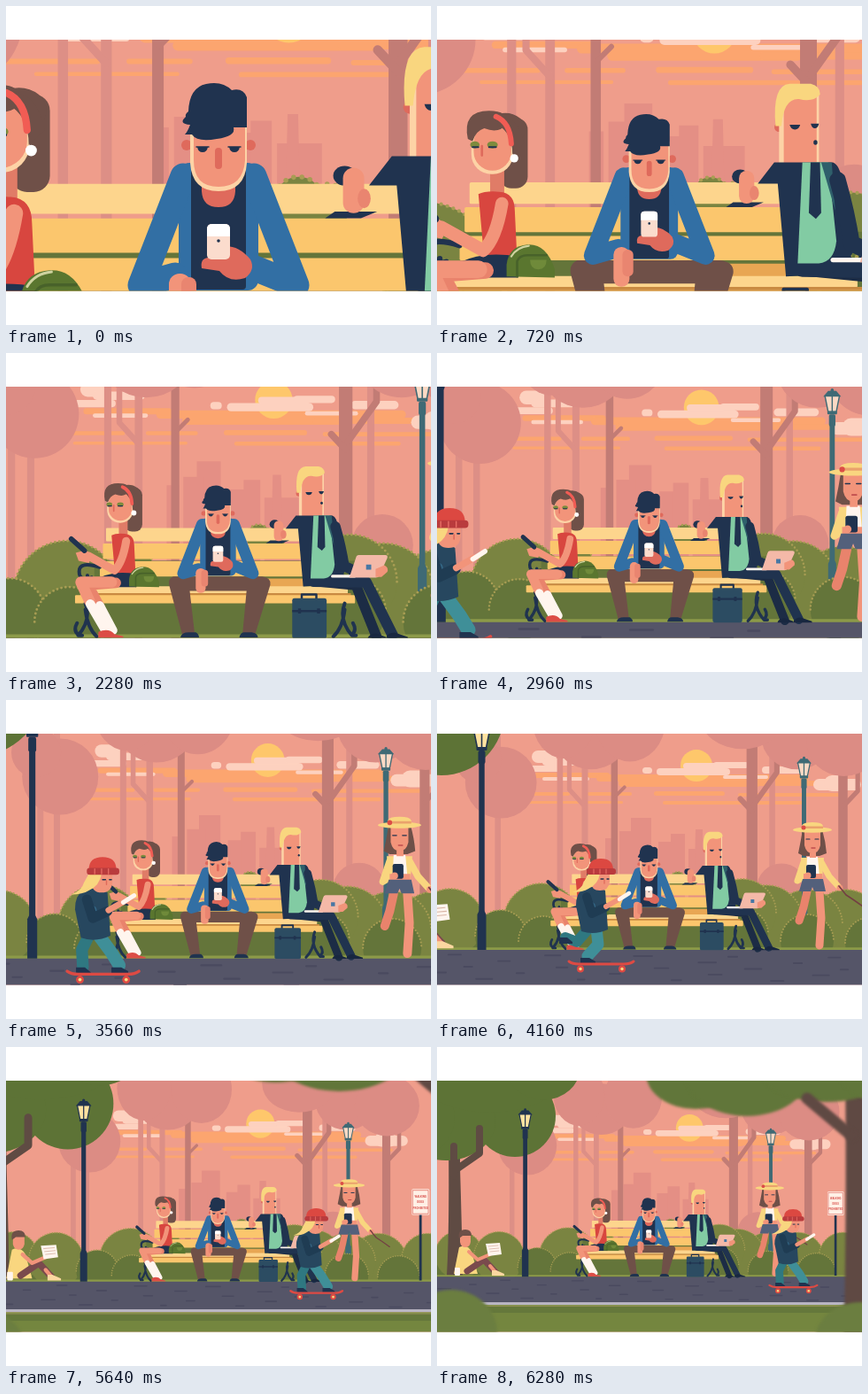
These frames come from a looping animation (480 by 360 pixels, 6.32 s). An HTML page with a canvas:

```html
<!DOCTYPE html>
<html lang="en">
<head>
<meta charset="utf-8">
<title>Park bench</title>
<style>
html, body { margin: 0; width: 100%; height: 100%; overflow: hidden; background: #fff }
canvas { display: block; width: 480px; height: 360px }
</style>
</head>
<body>
<canvas id="stage" width="480" height="360"></canvas>
<script>
const c = document.getElementById('stage').getContext('2d');
const LOOP = 6320, CX = 239, CY = 194.7;
const NAVY = '#20334f', SKIN = '#f2947a', RED = '#df6a5c', RIM = '#fdd3a6', BLUE = '#326fa4',
  YELLOW = '#f9d67f', TEAL = '#3f8f98', WHITE = '#fff5ee', BROWN = '#6f5048',
  OLIVE = '#64753a', MOSS = '#7a8441';
// Camera distances at which the parts were laid out
const NEAR = .385, CLOSE = .708, MID = 1, WIDE = 1.246, FAR = 1.685;
let dist = NEAR;

function fill(color, d) { c.fillStyle = color; c.fill(new Path2D(d)); }
function line(color, width, d) {
  c.strokeStyle = color; c.lineWidth = width; c.stroke(new Path2D(d));
}
function box(color, x, y, w, h, r = 0) {
  c.fillStyle = color; c.beginPath(); c.roundRect(x, y, w, h, r); c.fill();
}
function oval(color, x, y, rx, ry = rx) {
  c.fillStyle = color; c.beginPath(); c.ellipse(x, y, rx, ry, 0, 0, 7); c.fill();
}
function shifted(x, y, draw) {
  c.save(); c.translate(x, y); draw(); c.restore();
}
// Perspective dolly: depth is relative to the bench
function layer(depth, ref, draw) {
  if (dist + depth < .1) return;
  const k = (ref + depth) / (dist + depth);
  c.save();
  c.translate(CX, CY); c.scale(k, k); c.translate(-CX, -CY);
  draw();
  c.restore();
}
function mix(a, b, u) { return a + (b - a) * u; }

function sky() {
  const peach = '#fdd1bf', orange = '#fca56f';
  const row = (color, list) => list.forEach(([x, y, w, h]) => box(color, x, y, w, h, h / 2));
  row(orange, [[110, 82, 85, 6], [180, 84, 240, 8], [205, 90, 160, 8], [330, 91, 100, 6], [60, 104, 90, 4],
    [170, 104, 50, 4], [245, 103, 80, 5], [340, 105, 120, 4], [100, 114, 110, 3], [255, 114, 160, 4]]);
  oval('#fec76b', 293, 74, 18);
  row(peach, [[107, 57, 28, 14], [101, 74, 40, 7], [119, 66, 50, 8], [119, 87, 53, 4],
    [232, 76, 11, 7], [248, 77, 83, 8], [278, 71, 50, 7], [323, 85, 51, 4],
    [367, 75, 46, 8], [312, 70, 40, 7], [425, 89, 54, 13], [437, 85, 28, 18]]);
}

function city() {
  const d = '#e48f85';
  box(d, 219, 133, 23, 100); box(d, 206, 148, 20, 90); box(d, 190, 156, 12, 80);
  box(d, 250, 160, 22, 80); box(d, 264, 151, 16, 90); box(d, 284, 168, 34, 80);
  fill(d, 'M292 146h8l2 90h-12z');
}

function pinkTrees() {
  const light = '#dd8f86', dark = '#c27c75', leaf = '#dc8c84';
  const trunk = (color, x, w) => box(color, x - w / 2, -80, w, 400);
  for (const x of [25, 45, 125, 398]) trunk(light, x, 7.5);
  trunk(light, 157, 8);
  line(light, 6, 'M137 -80V88L157 110');
  trunk(dark, 195, 8.5);
  line(dark, 4.5, 'M196 97L208 85');
  trunk(dark, 372, 14);
  line(dark, 7, 'M372 116L357 100M374 108L404 66V-80');
  trunk(dark, 489, 12);
  line(dark, 6, 'M489 110L508 90V-80');
  oval(leaf, 49, 79, 46); oval(leaf, 20, 50, 30);
  oval(leaf, 165, 22, 46, 40); oval(leaf, 215, 2, 45, 50); oval(leaf, 130, 0, 40, 48);
  oval(leaf, 430, 20, 46, 42); oval(leaf, 490, 26, 48, 45); oval(leaf, 360, -6, 55, 42);
  oval(leaf, 410, 215, 32);
}

function bush(x, y, r, color = MOSS) {
  oval(color, x, y, r);
  c.setLineDash([0, 3.4]);
  line('#a89d53', 2, `M${x - r} ${y}a${r} ${r} 0 0 1 ${2 * r} 0`);
  c.setLineDash([]);
}
function backBushes() {
  box(OLIVE, -400, 256, 1400, 50);
  bush(-45, 248, 36); bush(15, 251, 38); bush(118, 250, 43); bush(176, 222, 10);
  bush(272, 204, 10); bush(284, 206, 9); bush(462, 254, 40); bush(530, 250, 36);
  bush(418, 254, 40); bush(372, 250, 41); bush(345, 240, 38);
  box(OLIVE, 140, 223, 215, 60);
}
function frontBushes() {
  bush(72, 266, 29, OLIVE); bush(120, 272, 28, OLIVE); bush(346, 264, 28, OLIVE);
  bush(418, 272, 30, OLIVE); bush(490, 274, 29, OLIVE);
}

function ground() {
  box('#8c9a48', -700, 300, 2000, 4);
  box('#555568', -700, 303.5, 2000, 50);
  for (let i = 0; i < 46; i++) {
    const y = 307 + (i * 17) % 42;
    box('#4a4a5f', -330 + i * 27 + (i * i * 7) % 19, y, 12 + (i * 11) % 17, 2.4, 1.2);
  }
  box('#b9b5c2', -700, 352, 2000, 5);
  box('#82924a', -700, 357, 2000, 3);
  box('#65783b', -700, 360, 2000, 14);
  box('#74863f', -700, 372, 2000, 100);
}

function lamp(x, color, glass) {
  box(color, x - 3.2, 70, 6.4, 206);
  fill(color, `M${x - 5} 282v-40q5 -12 10 0v40z`);
  fill(glass, `M${x - 9} 34h18l-4 20h-10z`);
  line(color, 1.6, `M${x - 9} 34l4 20h10l4 -20M${x} 34v20`);
  fill(color, `M${x - 11} 35l6 -7h10l6 7z`);
  box(color, x - 2, 25, 4, 5, 2);
  box(color, x - 6, 53, 12, 4, 1); box(color, x - 4, 57, 8, 15, 2);
}

function leftTree() {
  const wood = '#5f4b43', leaf = '#5d7336';
  fill(wood, 'M11 258Q15 190 12 40H26V135Q28 200 29 258Z');
  oval(leaf, 88, 78, 46, 46); oval(leaf, 10, 84, 56, 44); oval(leaf, -40, 80, 60, 50);
  oval(leaf, 60, 22, 90, 52); oval(leaf, 120, 22, 42, 38);
  line(wood, 8, 'M19 146V112M22 138L48 120V92');
}

function reader() {
  fill(YELLOW, 'M25 226Q34 222 39 231L46 256H19Z');
  line('#7a4a4d', 7, 'M34 253L53 240L66 254');
  line(SKIN, 4, 'M36 231L46 240L60 234M60 247L66 254');
  fill(SKIN, 'M26 211h12v9q-1 6 -6 6t-6 -6z');
  fill(BROWN, 'M25 216q-2 -10 7 -10q7 0 7 7h-10z');
  fill(WHITE, 'M55 222l16 -1l2 13l-15 2z');
  line('#d8b5a6', .8, 'M58 225l11 -1M59 228l11 -1M60 231l10 -1');
  fill('#fbd7a0', 'M62 252h5l9 4v2H62z');
  box(WHITE, 20, 249, 6, 9, 1);
}

function bench() {
  const wood = '#fbc66d', iron = side =>
    line(NAVY, 3.4, `M${side(125)} 235Q${side(105)} 229 ${side(105)} 239T${side(117)} 245` +
      `M${side(113)} 243V252M${side(111)} 270Q${side(117)} 286 ${side(104)} 301h4` +
      `M${side(111)} 276Q${side(113)} 294 ${side(122)} 302` +
      `M${side(103)} 289Q${side(99)} 296 ${side(104)} 300`);
  box('#fdd58d', 131, 197, 214, 13, 1);
  box(wood, 128, 212, 220, 15, 1); box(wood, 125, 229.3, 226, 14.7, 1);
  box('#e8a653', 285, 246, 37, 8);
  box('#fdd58d', 109, 253.5, 256, 7, 1);
  box('#c98a42', 106, 260, 262, 3);
  box(wood, 101, 262, 271, 8, 1);
  iron(x => x); iron(x => 473 - x);
}

function girl() {
  box(BROWN, 112, 143, 24, 60, 10);
  oval(BROWN, 117, 153, 17, 14);
  fill('#e07c67', 'M104 186h12v22q-6 6 -12 0z');
  fill('#d8463f', 'M94 208Q100 205 112 206Q125 207 125 222L127 264H99Z');
  box(RIM, 88, 148, 35.5, 43, 17);
  box(SKIN, 90, 148, 32, 40, 16);
  fill(BROWN, 'M85 161Q80 137 103 137Q120 137 118 148Q112 157 99 152Q92 154 89 163Z');
  fill(BROWN, 'M112 142Q128 141 133 165L123 174Q123 156 110 149Z');
  line('#f15c54', 4.5, 'M109 142Q121 147 122 165');
  oval('#7d8b3d', 91, 166, 4, 3); oval('#7d8b3d', 106, 166, 4.5, 3);
  line(NAVY, 1.4, 'M89 168h5M103 168h6');
  line(RED, 2, 'M97 167v8');
  oval('#fff', 124.5, 177.5, 3.5);
  fill(NAVY, 'M78 266Q98 256 128 261V279H84Z');
  line('#e9836c', 14, 'M100 273L62 276L78 306');
  line(WHITE, 12, 'M78 304L96 338');
  line(SKIN, 15, 'M94 272L52 272L64 298');
  line(WHITE, 13, 'M65 302L86 338');
  fill('#dc4d46', 'M76 340q14 -6 22 3l12 3v2H76z');
  line(SKIN, 11, 'M114 216Q109 246 98 256L62 236');
  fill(SKIN, 'M45 232l14 -4l9 8l-5 10l-14 -3z');
  line(NAVY, 7, 'M39 213L57 229');
}

function bag() {
  fill('#5a762f', 'M118 278V268Q120 252 136 251Q152 250 159 272V279Z');
  line('#cfd3a0', 1.6, 'M122 261Q127 253 137 252');
  line('#48622a', 2, 'M127 278V265Q129 260 136 260H152');
  fill('#6f8a3a', 'M138 264h14q0 8 -7 8t-7 -8z');
}

function centreLegs() {
  fill(BROWN, 'M196 244H282Q291 245 290 252L275 301H263L267 258H212L217 301H205L192 252Q191 246 196 244Z');
  fill(NAVY, 'M203 303q1 -5 8 -5h7q3 2 3 5zM260 303q1 -5 5 -5h7q6 1 6 5z');
}
function centreHead() {
  oval(RED, 204, 157, 6); oval(RED, 276, 157, 6);
  fill(RIM, 'M208 130H272V177Q270 209 240 209T208 177Z');
  fill(SKIN, 'M212 130H270V174Q268 204 240 204T212 174Z');
  fill(NAVY, 'M202 145H210Q216 154 238 150Q260 147 257 137H272V103Q268 92 255 95Q244 84 226 88Q207 92 206 119Q202 122 203 125Q194 133 208 134Q205 142 202 145Z');
  box(RED, 236, 160, 8, 24, 4);
  fill(NAVY, 'M216 159h12q-1 6 -6 6t-6 -6zM252 159h12q-1 6 -6 6t-6 -6z');
  line(NAVY, 1.5, 'M215 159h14M251 159h14');
}
function centreMan(t) {
  // The head sinks to the phone and lifts again before the loop closes
  const nod = 7 * Math.min(1, t / .7, (6.32 - t) / .7);
  box(BLUE, 195, 177, 90, 144, 12);
  line(BLUE, 29, 'M200 192L152 315L191 304M280 192L328 315L276 294');
  box(NAVY, 209, 184, 62, 136, 4);
  fill(RED, 'M221 195H259V209Q258 227 240 227T221 209Z');
  shifted(0, nod, centreHead);
  fill(RED, 'M246 271Q263 270 276 286Q282 298 270 307Q252 313 241 299L221 296Q219 285 228 284H246Z');
  box('#fbdccd', 227, 246, 26, 40, 5);
  fill('#fff', 'M227 260V252Q227 246 233 246H247Q253 246 253 252V260Z');
  oval(NAVY, 240, 265, 1.8);
  box(SKIN, 184, 302, 25, 62, 12);
  box('#e98570', 198, 306, 17, 42, 8);
}

function suitHead() {
  oval(RED, 357, 151, 4);
  fill(RIM, 'M357 122H391V182H357Z');
  fill(SKIN, 'M361 122H389V182H361Z');
  fill(YELLOW, 'M354 150Q351 115 366 114H384Q392 116 392 123Q386 130 374 127Q361 126 359 150Z');
  fill(NAVY, 'M366 149h9q-1 4 -4.500 4t-4.500 -4zM384 148h7q-1 4 -3.500 4t-3.500 -4z');
  oval(NAVY, 388, 164, 1.7, 2);
}
function suitMan(t) {
  const sway = 3.5 * (Math.cos(t * 8 * Math.PI / 6.32) - 1);
  line('#1c2c45', 14, 'M365 270L428 276L456 346');
  line(NAVY, 15, 'M370 271L442 272L478 344');
  fill('#182740', 'M444 349q2 -7 12 -7l13 5v2zM469 349q2 -8 12 -8l18 6v2z');
  shifted(sway, 0, suitHead);
  fill(NAVY, 'M332 199L346 181H396Q402 183 404 198L414 255Q408 270 393 276L356 278L349 199Z');
  fill(NAVY, 'M305 219h22l10 -4h-26z');
  oval(NAVY, 317, 193, 7, 6);
  box(SKIN, 316, 188, 13, 28, 6.5);
  oval('#e98570', 329, 207, 4, 6);
  fill('#82cba3', 'M370 181H392L399 248Q397 266 384 267H366Z');
  fill('#2f5f6b', 'M386 181H395L398 222Z');
  fill(NAVY, 'M377 181h8l1 43l-4.500 5l-6 -5z');
  line(NAVY, 14, 'M400 196Q408 224 412 250L434 260');
  box(WHITE, 394, 262, 34, 4, 2);
  fill('#f4b9a8', 'M432 235H468Q472 235 471 239L460 263Q459 266 455 266H419L428 239Q429 235 432 235Z');
  box('#4777a4', 442, 248, 7, 7);
  fill(SKIN, 'M455 254l12 -5q6 3 4 9l-8 7h-8z');
}

function briefcase() {
  line(NAVY, 3, 'M354 295V289H374V295');
  box('#2c4c62', 341, 294, 47, 55, 3);
  box(NAVY, 341, 310, 47, 3);
  box(NAVY, 349, 308, 4, 7); box(NAVY, 375, 308, 4, 7);
}

function hatWoman() {
  fill(BROWN, 'M413 146h22q4 14 5 27l-8 3h-18l-6 -3q3 -14 5 -27z');
  line('#e9836c', 9, 'M418 216L414 234L409 249');
  line(SKIN, 9, 'M432 216L434 246L432 277');
  line(YELLOW, 7, 'M414 183L407 204L420 196M434 183L443 199L453 210');
  fill(YELLOW, 'M411 178H437L435 202H413Z');
  fill(WHITE, 'M418 177h12l2 22h-15z');
  box(SKIN, 414, 196, 21, 8);
  fill('#53607b', 'M413 202H436L439 216H426L424 211L422 216H409Z');
  fill(SKIN, 'M415 149h18v15q-2 9 -9 9t-9 -9zM421 171h7v7h-7z');
  line(NAVY, 1.2, 'M417 157h4M427 157h4'); line('#c04e4e', 1.4, 'M423 167h4');
  fill(YELLOW, 'M412 147V142Q413 138 424 138T436 142V147Z');
  oval(YELLOW, 424, 146.5, 22, 3.2);
  box('#eaa26c', 412, 142.5, 24, 2.5);
  oval('#dc4d46', 414, 144, 2.5);
  box(NAVY, 417, 186, 11, 15, 2); oval(SKIN, 419, 198, 3.5);
  oval(SKIN, 455, 212, 3.5);
  line('#733f43', 1.6, 'M454 210L462 220Q470 225 481 233');
}

function sign() {
  box(NAVY, 448.8, 185, 2.6, 73);
  box('#fff0e6', 441, 163, 18.5, 27, 1.5);
  line('#e26b60', .7, 'M442.3 164.3h16v24.4h-16z');
  c.fillStyle = '#d9534e'; c.textAlign = 'center';
  c.font = 'bold 2.8px Roboto, sans-serif';
  ['WALKING', 'DOGS', 'PROHIBITED'].forEach((word, i) => c.fillText(word, 450.2, 172 + i * 5.8));
}

function skaterX(t) {
  const keys = [[2.96, -224], [4.16, -67], [5, 71], [6.28, 275]];
  const i = t < 4.16 ? 0 : t < 5 ? 1 : 2, [a, x] = keys[i], [b, y] = keys[i + 1];
  return mix(x, y, (t - a) / (b - a));
}
function skater(t) {
  const p = Math.max(0, 1 - Math.abs(t - 4.16) / .5), u = p * p * (3 - 2 * p);
  const fx = mix(165, 145, u), fy = mix(291, 268, u), kx = mix(164, 158, u);
  const front = mix(202, 170, u);
  c.translate((skaterX(t) + 67) / WIDE, 0);
  line('#2f7881', 12, `M172 257L${kx} 273L${fx} ${fy}`);
  fill(NAVY, `M${fx - 7} ${fy}h9l6 5v2h-15z`);
  line(TEAL, 13, `M180 257L${mix(194, 182, u)} 276L${front} 289`);
  fill(NAVY, `M${front - 8} 291h10l7 4v2h-17z`);
  line('#dd4a43', 3, 'M149 295Q153 298 160 298H211Q218 298 222 295');
  for (const x of [162, 209]) { oval('#dd4a43', x, 303.5, 4); oval(YELLOW, x, 303.5, 1.7); }
  fill('#27475f', 'M165 213Q180 208 190 215L193 259Q178 266 163 261L157 232Q157 218 165 213Z');
  oval('#356887', 174, 233, 5);
  fill(SKIN, 'M174 195h21v10q-1 10 -11 10t-10 -10z');
  fill(YELLOW, 'M171 196h13q-2 12 -13 17q-6 4 -18 4q11 -4 13 -12z');
  line(NAVY, 1.3, 'M185 202h3M192 202h2'); line(RED, 1.3, 'M189 203v4');
  fill('#dc4841', 'M171 192Q171 179 185 179T199 192Z');
  box('#b93b3d', 169, 190, 33, 7, 3);
  line('#ee746a', 1, 'M177 191v5M184 191v5M191 191v5');
  line('#1f3c53', 10, 'M169 222L175 241L190 234');
  line(SKIN, 6, 'M191 233L207 224');
  line(WHITE, 4.5, 'M206 225L217 218');
}

function foreground() {
  const wood = '#5f4943', leaf = '#61763a';
  c.filter = 'blur(1.5px)';
  fill(wood, 'M461 20H530V340H459Q463 200 461 20Z');
  oval(leaf, 292, 30, 56, 40); oval(leaf, 350, 30, 70, 48);
  oval(leaf, 440, 20, 80, 42); oval(leaf, 520, 20, 70, 46);
  line(wood, 13, 'M418 58L468 100');
  oval('#6b7e40', 16, 323, 52, 49); oval('#6b7e40', 478, 334, 52, 46);
  c.filter = 'none';
}

function draw(now) {
  const t = Math.floor(now % LOOP / 40) * .04;
  dist = NEAR + .207 * t;
  c.lineJoin = c.lineCap = 'round';
  c.fillStyle = '#fff'; c.fillRect(0, 0, 480, 360);
  c.save();
  c.beginPath(); c.rect(0, 38, 480, 283.5); c.clip();
  box('#ef9d8b', 0, 38, 480, 284);
  layer(1.37, WIDE, () => { sky(); city(); });
  layer(.77, MID, pinkTrees);
  layer(.1, WIDE, backBushes);
  layer(.37, WIDE - .37, () => lamp(466.6, '#3f6a75', '#fbd9c4'));
  layer(-.45, FAR, leftTree);
  layer(.1, WIDE, frontBushes);
  layer(0, MID, ground);
  layer(0, FAR, reader);
  layer(0, WIDE, () => lamp(50.5, NAVY, '#ffe2a0'));
  layer(0, MID, bench);
  layer(0, CLOSE, () => { girl(); bag(); suitMan(t); briefcase(); });
  layer(0, MID, centreLegs);
  layer(0, NEAR, () => centreMan(t));
  layer(0, WIDE, hatWoman);
  layer(0, FAR, sign);
  layer(0, WIDE, () => skater(t));
  layer(-1, FAR, foreground);
  c.restore();
}

const start = performance.now();
function tick() {
  draw(performance.now() - start);
  requestAnimationFrame(tick);
}
tick();
</script>
</body>
</html>
```
